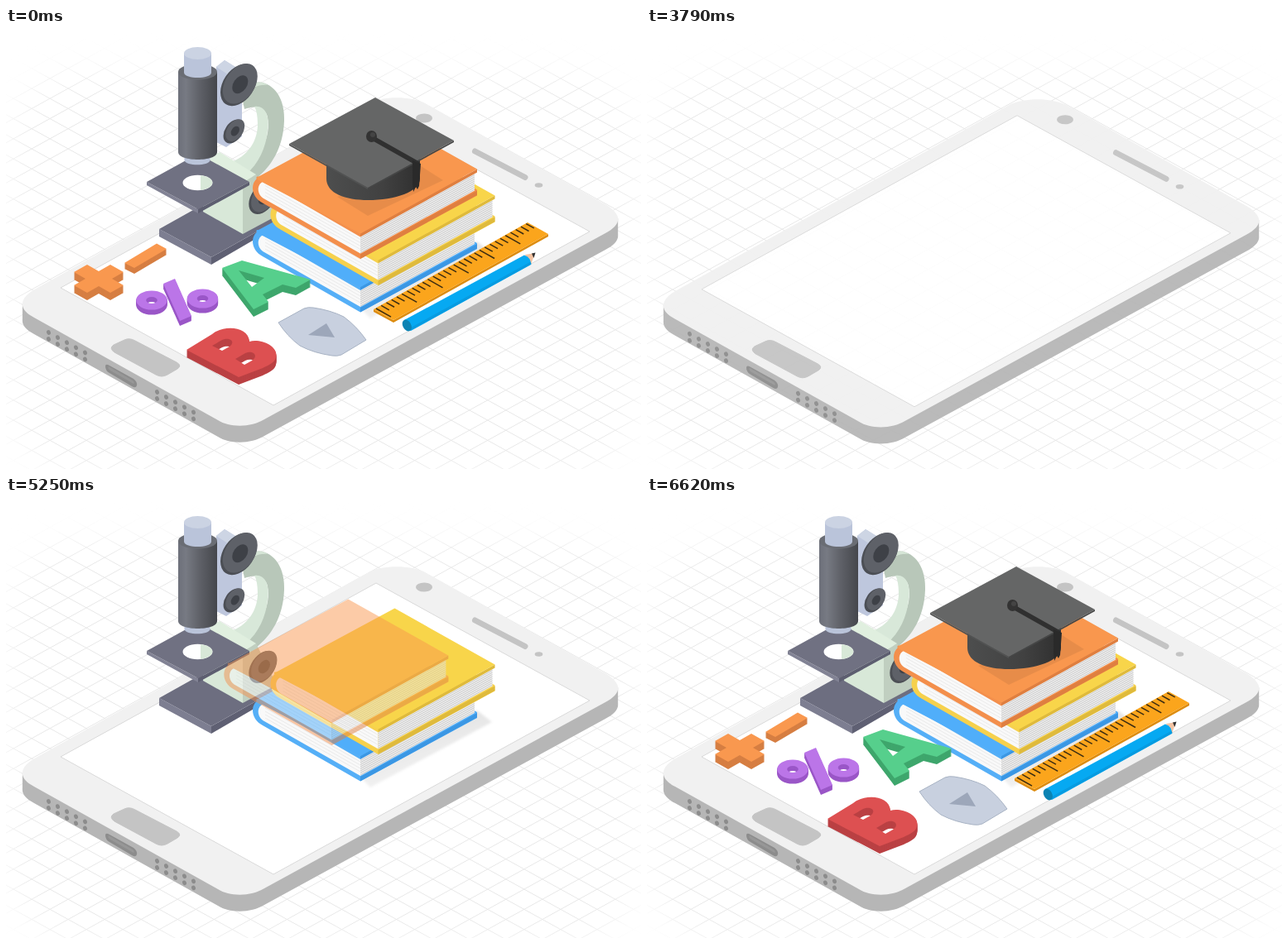
An HTML page that plays this animation: 767 by 533 pixels, repeating every 6650 ms.

```html
<!DOCTYPE html>
<html lang="en">
<head>
<meta charset="utf-8">
<title>Learning on a phone</title>
<style>
html, body { margin: 0; width: 100%; height: 100%; overflow: hidden; background: #fff; }
svg { display: block; width: 767px; height: 533px; }
</style>
</head>
<body>
<svg id="stage" viewBox="0 0 767 533" xmlns="http://www.w3.org/2000/svg"></svg>
<script>
const LOOP = 6650, FADE_START = 2170, FADE_END = 2770, INTRO = 3477, ENTER = 333;
const stage = document.getElementById('stage');
const range = (n, f) => Array.from({ length: n }, (_, i) => f(i)).join('');
const path = (d, fill, more = '') => `<path d="${d}" fill="${fill}" ${more}/>`;
const poly = (points, fill, more = '') => `<polygon points="${points}" fill="${fill}" ${more}/>`;
const oval = (x, y, rx, ry, fill, turn = 0) =>
  `<ellipse cx="${x}" cy="${y}" rx="${rx}" ry="${ry}" fill="${fill}" transform="rotate(${turn} ${x} ${y})"/>`;
const line = (x1, y1, x2, y2, stroke, width, cap = 'butt') =>
  `<line x1="${x1}" y1="${y1}" x2="${x2}" y2="${y2}" stroke="${stroke}" stroke-width="${width}" stroke-linecap="${cap}"/>`;

// Flat shape with a vertical thickness
function extrude(d, top, side, depth) {
  return range(depth, i => path(d, side, `fill-rule="evenodd" transform="translate(0 ${depth - i})"`)) +
    path(d, top, 'fill-rule="evenodd"');
}

function grid() {
  return range(56, i => {
    const y = -430 + i * 24.3;
    return line(0, y, 767, y + 423, '#e8e8e8', 1) + line(0, y + 423, 767, y, '#e8e8e8', 1);
  });
}

function phone() {
  const face = 'M38 314L438 91C455 82 490 82 508 92L720 211C745 224 745 237 724 248L312 473C296 483 270 483 256 474L34 350C14 340 15 326 38 314Z';
  const holes = (x, y) => range(10, i => {
    const col = i % 5;
    return oval(x + col * 11, y + col * 6.1 + (i > 4 ? 8 : 0), 2.4, 2.9, '#8c8c8c', -20);
  });
  return path(face, '#b6b6b6', 'transform="translate(0 20)"') +
    poly('19.9 333 739.2 230 739.2 250 19.9 353', '#b6b6b6') +
    path(face, '#f1f1f1') +
    poly('66 314 447 104 705 246 323 456', '#fff', 'stroke="#d6d6d6" stroke-width=".9"') +
    oval(505, 109, 10, 5.6, '#c4c4c4') +
    line(566.5, 149, 627, 180.5, '#c4c4c4', 7, 'round') +
    oval(643.5, 190, 4.8, 2.8, '#c4c4c4') +
    path('M130 383L143 377Q149 374 156 378L206 404Q213 408 207 412L195 419Q188 423 181 419L131 392Q124 387 130 383Z',
      '#c4c4c4', 'stroke="#c4c4c4"') +
    path('M120 409q0-4 5-1L154 424q5 4 4 8q-1 4-6 1L125 417q-5-3-5-8Z', '#8c8c8c') +
    path('M124 409L153 426Q156 429 154 430L126 414Q122 411 124 409Z', '#979797') +
    holes(51.5, 368) + holes(182.5, 440);
}

function knob(x, y, a, b, hub) {
  return oval(x - 1, y + 1, a, b, '#4c4f55', -56) +
    oval(x + .8, y - .4, a - 1.2, b - 1, '#5e6168', -56) +
    oval(x + .8, y + .6, hub, hub * .68, '#3e4147', -56);
}

function microscope() {
  return poly('185 243 248 277 248 286 185 252', '#7d7e91') +
    poly('248 277 332 230 332 237 248 286', '#5f6073') +
    poly('185 243 269 196 332 230 248 277', '#6d6e80') +
    // arm and column
    path('M284 78C292 68 302 63 313 67C329 73 337 92 336 112C335 145 320 168 302 182L284 172C309 157 320 130 316 108C314 97 303 92 288 98Z', '#b8c7b9') +
    path('M284 78C292 68 302 63 313 67L316 69C305 68 296 72 288 82Z', '#d5e5d6') +
    path('M300 95C312 93 319 105 316 124C314 145 305 164 290 177L270 163C292 155 303 138 304 118C304 108 303 100 300 95Z', '#d8e8d9') +
    poly('286 186 302 177 327 227 286 249', '#c0cfc0') +
    poly('238 160 286 186 286 249 238 222', '#d8e8d8') +
    poly('242 158 258 150 302 177 286 187', '#e0efdf') +
    knob(311, 204.5, 21.5, 14, 9) +
    // bracket
    poly('254 47 264 39 285 52 285 131 266 144 254 138', '#bec7dd') +
    poly('254 47 264 39 285 52 274 60', '#cdd5e4') +
    knob(282, 67.7, 28, 18.7, 12) + knob(276, 124, 16, 10.5, 6.5) +
    // specimen stage
    poly('170 186 232 219 232 224 170 190', '#818294') +
    poly('232 219 294 186 294 190 232 224', '#5d5e70') +
    poly('170 186 232 152 294 186 232 219', '#707182') +
    oval(231.5, 187, 18, 9.2, '#fff') +
    path('M235 178A18 9.2 0 0 1 235 196Z', '#d8e8d8') +
    // tube
    path('M215.5 152V160C217 167 245 167 246.5 160V152Z', '#bac4da') +
    path('M208 53V150C208 162 255 162 255 150V53Z', 'url(#tube)') +
    oval(231.5, 53, 23.5, 9.5, '#6a6d74') +
    path('M215 30V54C216 62 247 62 248 54V30Z', '#bac4da') +
    oval(231.5, 30.5, 16.5, 7.5, '#cbd3e3');
}

function book(x, y, [top, edge, dark]) {
  return `<g transform="translate(${x} ${y})">` +
    path('M310 243C294 247 294 268 310 276L428 343.5L569 267V260L448 192Z', edge) +
    poly('428 338 569 261 569 266.5 428 343.5', dark) +
    path('M314 249C302 251 302 266 312 271L428 337V316Z', '#f9f9f9') +
    range(4, i => line(313, 255 + i * 4, 428, 320 + i * 4, '#e6e6e6', .8)) +
    poly('428 316 566 239 566 261 428 337', '#efefef') +
    range(8, i => line(428, 318.5 + i * 2.5, 566, 242 + i * 2.5, '#c6c6c6', .9)) +
    path('M303 244Q300 248 312 250L428 317V313L310 245Z', edge) +
    poly('428 313 569 235 569 239 428 317', dark) +
    path('M448 167L569 235L428 313L308 250Q299 246 307 243Z', top) + '</g>';
}

function ruler() {
  return poly('444 340 468 353 655 249 655 252 468 356 444 343', '#dd8c10') +
    poly('444 340 630 235 655 249 468 353', '#fba51c') +
    range(30, i => {
      const x = 447 + i * 6.25, y = 339 - i * 3.53, len = i % 5 ? .38 : .72;
      return line(x, y, x + 25 * len, y + 14 * len, '#3b2c12', 1.5);
    });
}

function pencil() {
  return poly('627 274 639 272 634 286', '#f2c3a3') +
    poly('635 272.5 639.5 271.5 637.5 278', '#333') +
    path('M481 353L626 274.5Q634 277 634 286L489 366Z', '#06a9f2') +
    line(487.5, 364.5, 634, 284, '#079be0', 3) +
    oval(484.3, 359.5, 5, 7.4, '#0b83b3', -28);
}

const ring = (x, y, a, b) => `M${x - a} ${y}a${a} ${b} 0 1 0 ${2 * a} 0a${a} ${b} 0 1 0 ${-2 * a} 0Z`;
const donut = (x, y) => extrude(ring(x, y, 18.7, 11.5) + ring(x, y, 6.8, 4), '#bb75e8', '#9a56c7', 6);
const percent = () => donut(176, 329) + donut(237.5, 327) +
  extrude('M190 309L204 303L224 348L210 354Z', '#bb75e8', '#9a56c7', 6);

const sums = () =>
  extrude('M143 284L182 260.5L194 267L155 290Z', '#f9984f', '#d67e42', 7) +
  extrude('M82 295L98 286L112 294L126 286L142 295L128 303L142 311L126 320L112 312L98 320L82 311L96 303Z', '#f9984f', '#d67e42', 9);

const letterA = () => extrude('M261 290L285 281L368 304L350 314L334 310L310 322L317 331L299 340ZM281 293L312 302L297 313Z',
  '#56cf8c', '#3ea66c', 9);

const letterB = () => extrude('M218 389L249 370C264 358 293 361 294 379C308 375 330 385 326 398C325 404 318 407 310 411L281 422Z' +
  'M249 384L261 377C270 373 278 379 270 385L261 390ZM277 400L289 393C298 389 306 396 297 402L288 407Z', '#dd5051', '#ba4043', 9);

const play = () =>
  path('M329 356L360 339Q365 337 371 338Q392 341 408 349Q424 361 435 377L405 395Q400 397 394 396Q372 393 355 384Q340 373 329 356Z',
    '#c8d0df', 'stroke="#a8b3c4" stroke-width="1"') +
  poly('365 371 387 357 397 374', '#9da7ba');

function cap() {
  return poly('400 204 437 227 528 184 500 166', '#000', 'opacity=".07"') +
    path('M387 160V182C387 200 410 208 437 208C470 208 500 198 500 182V155Z', 'url(#band)') +
    poly('342 140 437 193 437 195 342 142', '#515252') +
    poly('437 193 541 136 541 138 437 195', '#454646') +
    poly('342 140 446 84 541 136 437 193', '#656666') +
    line(441, 132, 496, 163, '#303030', 5.5, 'round') +
    path('M491 160L501 164L499 191L497 195L495 192L492 198L491 186Z', '#2a2a2a') +
    oval(441.5, 131, 6.5, 7, '#333') + oval(443, 129, 3, 3, '#444');
}

const blue = ['#50aefa', '#55aff7', '#3b97e4'];
const yellow = ['#f8d54a', '#f6d14d', '#dfba3c'];
const orange = ['#f9974e', '#f38f4c', '#df7f40'];
const bookShadow = poly('440 351 587 272 569 258 428 338', 'url(#shade)', 'filter="url(#soft)"');

// Entry time, starting offset, drawing
const parts = [
  [3477, 0, 31, phone()],
  [3877, 0, 0, microscope()],
  [4262, 46, 28, bookShadow + book(0, 0, blue)],
  [4677, 54, -32, book(21.5, -32.5, yellow)],
  [5088, -68, 41, book(0, -64.5, orange)],
  [5482, 62, -36, ruler()],
  [5482, 62, -36, pencil()],
  [5877, -53, -33, sums()],
  [5877, -70, 48, percent()],
  [5877, 0, -45, letterA()],
  [5877, 77, 52, letterB()],
  [5877, 77, 53, play()],
  [6277, 0, -46, cap()]
];

stage.innerHTML = `<defs>
  <linearGradient id="tube"><stop stop-color="#6d707a"/><stop offset=".2" stop-color="#777a83"/>
    <stop offset=".55" stop-color="#5f6168"/><stop offset="1" stop-color="#45474c"/></linearGradient>
  <linearGradient id="band"><stop stop-color="#4d4e4e"/><stop offset=".6" stop-color="#414141"/><stop offset="1" stop-color="#2f2f2f"/></linearGradient>
  <linearGradient id="shade" x1=".3" y1=".2" x2=".7" y2=".9"><stop stop-color="#000" stop-opacity=".12"/>
    <stop offset="1" stop-color="#000" stop-opacity=".03"/></linearGradient>
  <filter id="soft"><feGaussianBlur stdDeviation="1.5"/></filter>
  <filter id="blur" x="-20%" y="-20%" width="140%" height="140%"><feGaussianBlur stdDeviation="18"/></filter>
  <mask id="edge" maskUnits="userSpaceOnUse" x="0" y="0" width="767" height="533">
    <rect x="4" y="50" width="759" height="490" rx="90" fill="#fff" filter="url(#blur)"/></mask>
</defs>
<rect width="767" height="533" fill="#fff"/>
<g mask="url(#edge)">${grid()}</g>
<g id="scene">${parts.map(p => `<g class="part">${p[3]}</g>`).join('')}</g>`;

const scene = document.getElementById('scene');
const groups = [...document.querySelectorAll('.part')];
const clamp = v => Math.max(0, Math.min(1, v));

function render(t) {
  const intro = t >= INTRO;
  scene.setAttribute('opacity', intro ? 1 : 1 - clamp((t - FADE_START) / (FADE_END - FADE_START)));
  parts.forEach(([start, dx, dy], i) => {
    const k = intro ? clamp((t - start) / ENTER) : 1;
    groups[i].setAttribute('opacity', k);
    groups[i].setAttribute('transform', `translate(${dx * (1 - k)} ${dy * (1 - k)})`);
  });
}

const began = performance.now();
function tick() {
  render((performance.now() - began) % LOOP);
  requestAnimationFrame(tick);
}
tick();
</script>
</body>
</html>
```
